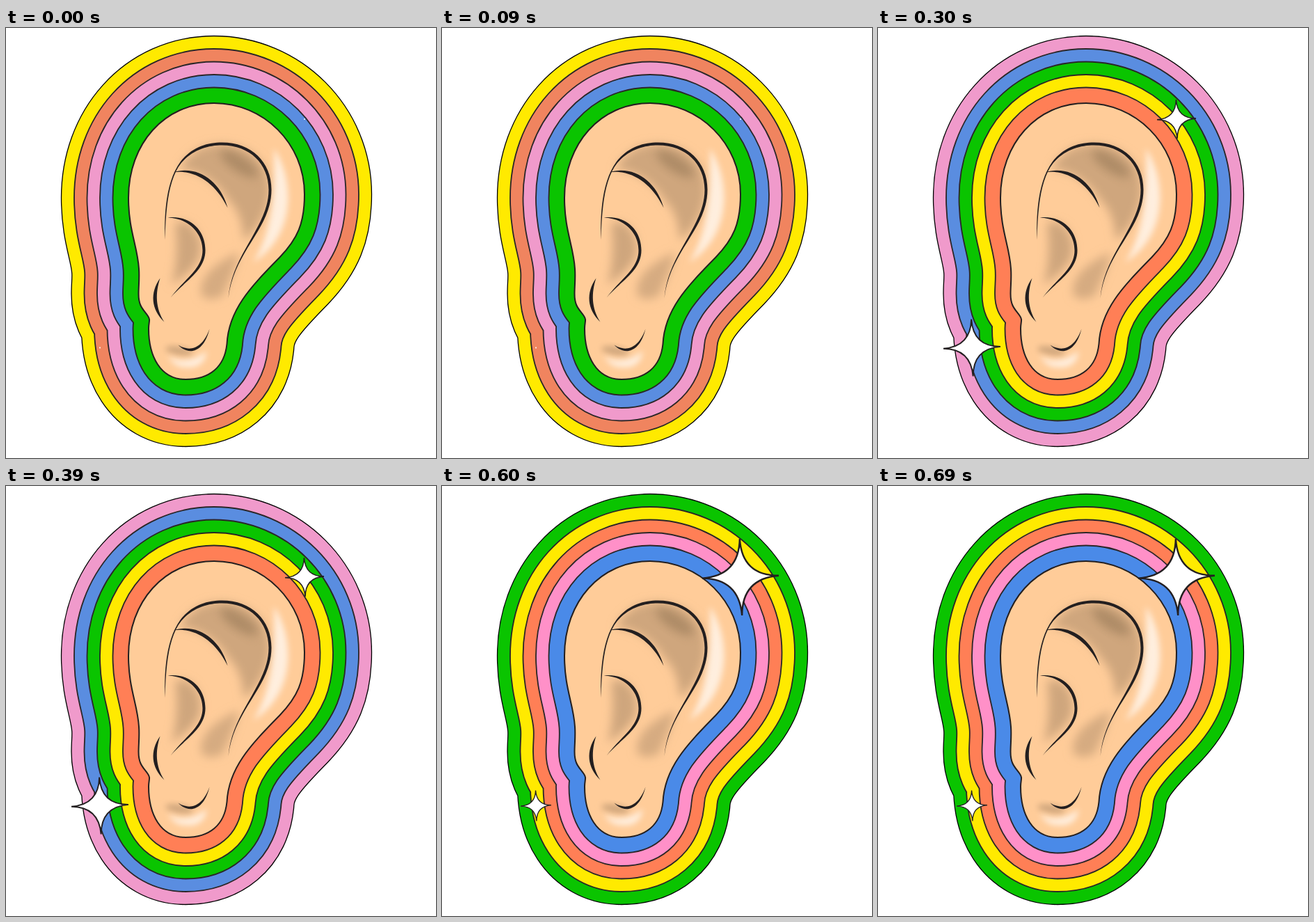
These frames come from a looping animation (618x618 px, 750 ms). An HTML page:

```html
<!DOCTYPE html>
<html lang="en">
<head>
<meta charset="utf-8">
<title>Ear</title>
<style>
  html, body { margin: 0; width: 100%; height: 100%; overflow: hidden; background: #fff; }
  svg { display: block; width: 618px; height: 618px; }
</style>
</head>
<body>
<svg viewBox="0 0 618 618">
  <defs>
    <path id="ear" d="M299 108 C370 108 429 166 429 239 C429 281 419 303 393 330
      C355 369 320 403 317.5 454 C314 488 292 505 258 505 C222 505 205 472 205 432
      C205 422 208 420 204 414 C197 404 190.500 400 190.500 382 C190.500 370 192 361 191 346
      C189 313 176 291 176 244 C176 166 228 108 299 108Z"/>
    <filter id="soft" x="-50%" y="-50%" width="200%" height="200%"><feGaussianBlur stdDeviation="7"/></filter>
    <filter id="fine" x="-50%" y="-50%" width="200%" height="200%"><feGaussianBlur stdDeviation="4"/></filter>
  </defs>
  <g id="rings" fill="none" stroke-linejoin="round"></g>
  <use href="#ear" fill="#ffcc99" stroke="#231f20" stroke-width="2"/>

  <g id="shades" fill="#cfa67d" filter="url(#soft)">
    <path d="M249 203 C268 172 290 167 311 167 C352 168 379 195 379 232 C378 262 364 286 342 306
      C340 280 335 262 320 248 C305 222 275 203 249 203Z"/>
    <path d="M243 280 C262 274 280 290 280 318 C280 338 262 352 238 370 C246 340 247 310 243 280Z"/>
    <path d="M280 380 C280 350 308 336 334 322 C332 345 320 365 312 384 C300 392 282 392 280 380Z" opacity=".85"/>
  </g>
  <ellipse cx="335" cy="195" rx="32" ry="11" transform="rotate(34 335 195)" fill="#a58461" opacity=".8" filter="url(#soft)"/>
  <ellipse cx="249" cy="464" rx="20" ry="6" transform="rotate(10 249 464)" fill="#cfa67d" filter="url(#fine)"/>
  <g id="lights" fill="#fff" opacity=".68" filter="url(#fine)">
    <path d="M385 173 C416 220 416 300 355 337 C380 300 388 240 385 173Z"/>
    <path d="M233 471 C245 481 270 480 288 464 C288 480 276 489 260 488 C247 488 238 482 233 471Z"/>
  </g>

  <g id="folds" fill="#231f20" transform="translate(.5 .5)">
    <path d="M228 304 C226 255 233 215 250 192 C266 171 288 164 310 164 C352 164 381 192 381 232
      C381 288 327 320 319 388 C324 324 377 285 377 232 C377 195 350 168 310 168
      C290 168 268 174 251 194 C234 216 229 255 228 304Z"/>
    <path d="M240 207 C275 196 308 220 318 258 C302 224 272 202 240 207Z"/>
    <path d="M232 272 C264 268 286 290 286 319 C286 348 258 362 236 387 C256 360 282 346 282 319 C282 294 262 273 232 272Z"/>
    <path d="M221 359 C206 380 208 404 227 422 C214 402 214 380 221 359Z"/>
    <path d="M247 455 C262 471 284 466 292 432 C282 460 264 466 247 455Z"/>
  </g>
  <g id="stars" fill="#fff" stroke="#231f20" stroke-linejoin="miter" stroke-miterlimit="4"></g>
</svg>
<script>
const STEP = 150, COUNT = 5;
const OFFSETS = [96.5, 78, 59.5, 41, 22.5];

// Each colour is vivid from the step at which it enters innermost until the loop ends.
const COLOURS = [
  { vivid: '#ffea00', dull: '#ffea00', from: 0 },
  { vivid: '#ff7f56', dull: '#f0845f', from: 2 },
  { vivid: '#ff90c8', dull: '#f09acb', from: 3 },
  { vivid: '#4a8ae8', dull: '#5a8de0', from: 4 },
  { vivid: '#0ac400', dull: '#0ac400', from: 0 }
];
const STARS = [
  { x: 429, y: 131, sizes: [1, 15, 28, 41, 55] },
  { x: 135, y: 459.5, sizes: [1, 21, 41, 56, 22] }
];

function add(parent, tag, attrs = {}) {
  const node = document.createElementNS('http://www.w3.org/2000/svg', tag);
  for (const key in attrs) node.setAttribute(key, attrs[key]);
  return document.getElementById(parent).appendChild(node);
}

const bands = OFFSETS.map((offset, i) => {
  const line = i ? 1.8 : 1.3;
  add('rings', 'use', { href: '#ear', stroke: i ? '#2a2627' : '#000', 'stroke-width': 2 * offset + line });
  return add('rings', 'use', { href: '#ear', 'stroke-width': 2 * offset - line });
});
const stars = STARS.map(() => add('stars', 'path'));

function starPath({ x, y }, r) {
  const at = (dx, dy) => `${x + dx * r} ${y + dy * r}`;
  const c = 0.04;
  return `M${at(-0.02, -1)} Q${at(c, -c)} ${at(1, -0.04)} Q${at(c, c)} ${at(0.04, 1)}` +
    ` Q${at(-c, c)} ${at(-1, 0.03)} Q${at(-c, -c)} ${at(-0.02, -1)}Z`;
}

function draw(time) {
  const step = Math.floor(time / STEP) % COUNT;
  bands.forEach((band, i) => {
    const colour = COLOURS[(i + step) % COUNT];
    band.setAttribute('stroke', step >= colour.from ? colour.vivid : colour.dull);
  });
  stars.forEach((star, i) => {
    const r = STARS[i].sizes[step];
    star.setAttribute('d', starPath(STARS[i], r));
    star.setAttribute('stroke', r > 1 ? '#231f20' : '#fff');
    star.setAttribute('stroke-width', 0.6 + r * 0.033);
  });
}

const start = performance.now();
function tick() {
  draw(performance.now() - start);
  requestAnimationFrame(tick);
}
tick();
</script>
</body>
</html>
```
